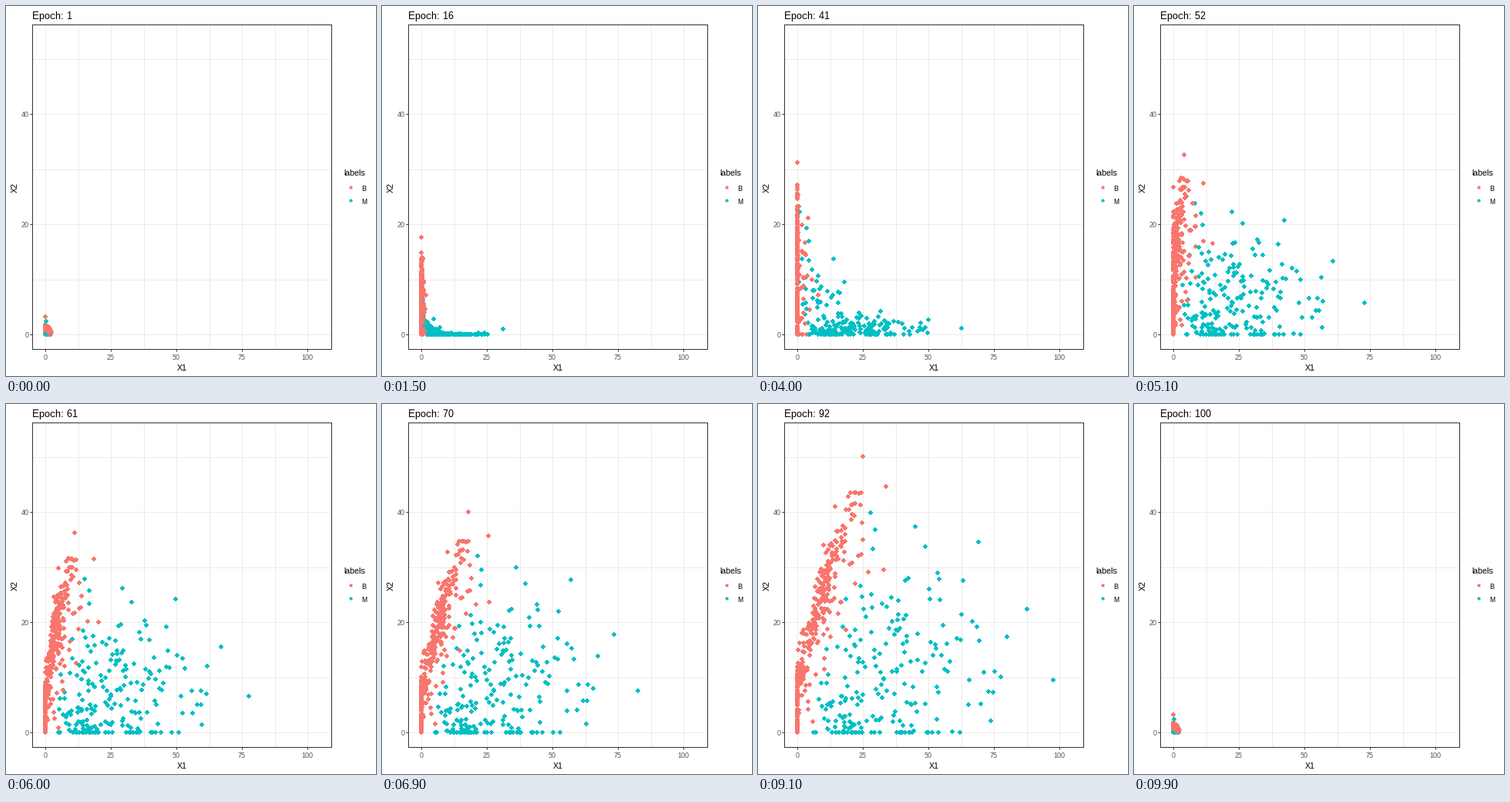
A matplotlib script that plays this animation: 480x480 px, repeating every 10000 ms.

```python
import numpy as np
import matplotlib.pyplot as plt
from matplotlib.animation import FuncAnimation

SIZE, DPI = 480, 80
PX = 72 / DPI                      # one pixel in points
EPOCHS = 100
RED, TEAL, GRID, DARK, GREY = "#F8766D", "#00BFC4", "#EBEBEB", "#333333", "#4D4D4D"
LEFT, RIGHT, TOP, BOTTOM = 34.5, 422.5, 24.5, 445.5
N_B, N_M = 357, 212

plt.rcParams.update({"font.family": "Liberation Sans", "text.hinting": "native",
                     "text.hinting_factor": 1})
rng = np.random.default_rng(12)


def relu(v):
    return np.maximum(v, 0)


def pose(x, y):
    return np.column_stack([relu(x), relu(y)])


def start(n, mx, sx, my, sy):
    """Small random activations before training."""
    x = np.clip(rng.normal(mx, sx, n), 0, 2.7)
    y = np.clip(rng.normal(my, sy, n), 0, 1.8 - .4 * x)
    return np.column_stack([x, y])


def class_m(n):
    """Poses of the wide fan: a low cluster plus a half-ellipse cloud."""
    pool = 1500
    low = rng.random(pool) < .55
    x = np.where(low, 4 + rng.gamma(2.3, 9.5, pool), rng.normal(38, 15, pool))
    y = relu(np.where(low, rng.exponential(8, pool) - 2.5, rng.normal(15, 10, pool)))
    inside = (x / 88) ** 2 + (y / 36) ** 2 < 1
    keep = inside & (x > 4) & (y < 3 + 1.2 * x) & ((y > 0) | (x < 60))
    x, y = x[keep][:n], y[keep][:n]
    # rim of the cloud
    x[:5] = 89.5, 80.4, 63.5, 41.4, 25.7
    y[:5] = 8.8, 20.5, 31.8, 34.3, 36.6
    first = start(n, .3, .5, -.25, .4)
    first[0] = .4, 2.4
    return [
        first,
        pose(np.maximum(.65 * x - .55 * y, .03 * x), .5 * y - .3 * x),
        pose(np.maximum(.75 * x - .5 * y, .03 * x),
             np.maximum(.85 * y - .42 * x + 2, .13 * y)),
        pose(np.maximum(.85 * x - .37 * y, .2 * x), .65 * y),
        pose(.93 * x - .065 * y, .88 * y - .2),
        pose(x, y),
        pose(1.16 * x, 1.16 * y)]


def class_b(n):
    """Poses of the steep band; r is the offset from its centre line."""
    y = np.where(rng.random(n) < .32, rng.uniform(-.5, 11, n), rng.normal(22, 8, n))
    y = np.clip(y, 0, 40)
    r = rng.normal(0, 1.5, n) + rng.exponential(3, n) * (rng.random(n) < .2)
    y[:2], r[:2] = (46, 41), (0, 11.2)     # tip and far outlier
    side = relu(r)
    y3 = .71 * y - .15 * side
    first = start(n, -.5, 1.2, .5, .55)
    first[0] = 0, 3.2
    return [
        first,
        pose(.35 * r - 1.5, .61 * y - 1.2 * side),
        pose(.5 * r - 1.4, .68 * y - .6 * side),
        pose(.2 * (y3 - 12) + .75 * r, y3),
        pose(.56 * (.87 * y - 8) + .9 * r, .87 * y),
        pose(.62 * (y - 9) + r, y),
        pose(1.16 * (.62 * (y - 9) + r), 1.16 * y)]


poses = np.array([np.vstack(p) for p in zip(class_b(N_B), class_m(N_M))])
colors = np.repeat([RED, TEAL], [N_B, N_M])
order = rng.permutation(N_B + N_M)
poses, colors = poses[:, order], colors[order]

# Epoch -> position along the list of poses
KEY_EPOCH = [1, 12, 23, 29, 41, 52, 70, 83, 99]
KEY_POSE = [0, .42, .87, 1, 2, 3, 4, 5, 6]


def to_px(p):
    """Data to whole stage pixels."""
    return np.round([51, 426] + p * [3.4, -7.14])


def points_at(epoch):
    if epoch == EPOCHS:            # training wraps back to the start
        return to_px(poses[0])
    k = np.interp(epoch, KEY_EPOCH, KEY_POSE)
    i = min(int(k), len(poses) - 2)
    return to_px(poses[i] + (poses[i + 1] - poses[i]) * (k - i))


fig = plt.figure(figsize=(SIZE / DPI, SIZE / DPI), dpi=DPI, facecolor="white")
ax = fig.add_axes([0, 0, 1, 1])
ax.set(xlim=(0, SIZE), ylim=(SIZE, 0))
ax.axis("off")


def line(xs, ys, color, z=1):
    ax.plot(xs, ys, color=color, lw=PX, zorder=z, snap=False,
            solid_capstyle="butt", solid_joinstyle="miter")


def label(x, y, s, size, color="black", ha="left", va="baseline", **kw):
    return ax.text(x, y, s, fontsize=size * PX, color=color, ha=ha, va=va, **kw)


def dots_at(xy, color):
    return ax.scatter(*np.transpose(xy), s=(4.2 * PX) ** 2, c=color,
                      linewidths=0, antialiased=False, zorder=3)


for i in range(9):
    gx = 51.5 + int(42.5 * i + .5)
    line([gx, gx], [TOP, BOTTOM], GRID)
    if i % 2 == 0:
        line([gx, gx], [BOTTOM, BOTTOM + 3], DARK)
        label(gx - .5, 459, f"{i * 25 // 2}", 9, GREY, "center")
for i in range(6):
    gy = 426.5 - int(71.4 * i + .5)
    line([LEFT, RIGHT], [gy, gy], GRID)
    if i % 2 == 0:
        line([LEFT - 3, LEFT], [gy, gy], DARK)
        label(29.5, gy + 3.5, f"{i * 10}", 9, GREY, "right")
line([LEFT, RIGHT, RIGHT, LEFT, LEFT, RIGHT], [TOP, TOP, BOTTOM, BOTTOM, TOP, TOP],
     DARK, 5)

label(228, 473, "X1", 11, ha="center")
label(16.5, 235.5, "X2", 11, ha="right", va="center", rotation=90)
label(438.5, 220, "labels", 11)
for y, name, color in [(235, "B", RED), (252, "M", TEAL)]:
    dots_at([(447, y)], color)
    label(461.5, y + 5, name, 9)

title = label(33.5, 17, "Epoch: 1", 13)
dots = dots_at(points_at(1), colors)


def update(frame):
    epoch = frame + 1
    title.set_text(f"Epoch: {epoch}")
    dots.set_offsets(points_at(epoch))
    return title, dots


anim = FuncAnimation(fig, update, frames=EPOCHS, interval=100, repeat=True,
                     repeat_delay=0, blit=False)
plt.show()
```
